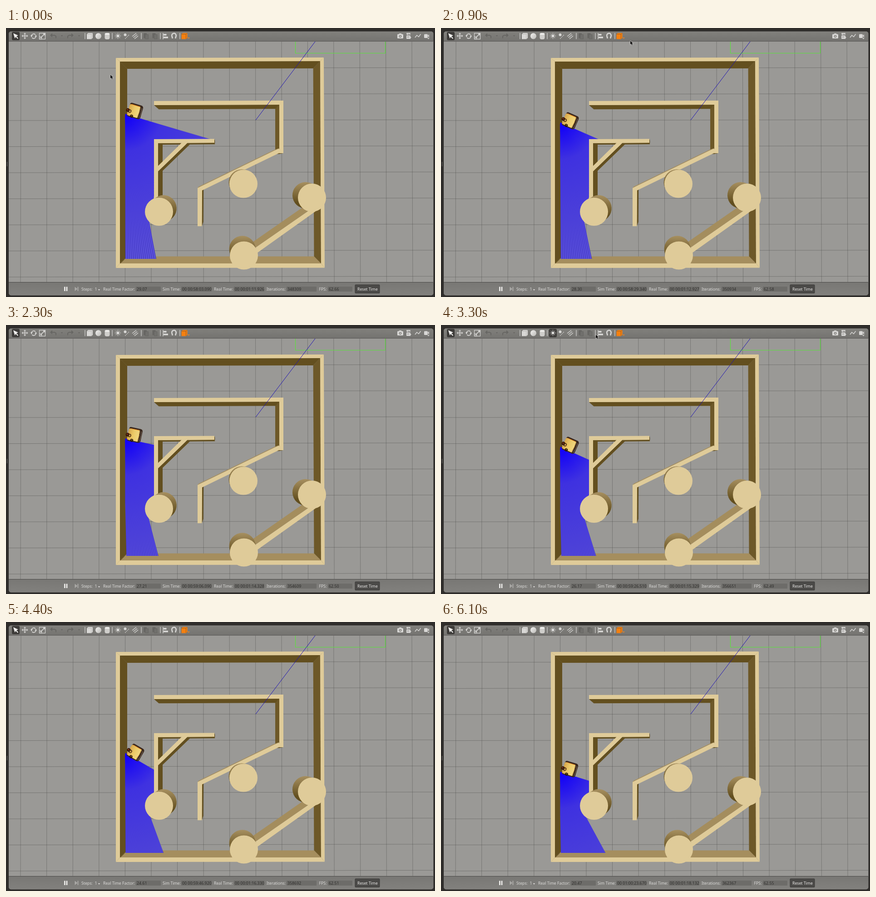
Recreate the animation shown at these times as an HTML page with a canvas. Size 945 px wide and 593 px high, loop 6200 ms.

```html
<!DOCTYPE html>
<html lang="en">
<head>
<meta charset="utf-8">
<title>Robot simulation</title>
<style>
html, body { margin: 0; width: 100%; height: 100%; overflow: hidden; background: #2f2d2b; }
canvas { display: block; }
</style>
</head>
<body>
<canvas id="stage" width="945" height="593"></canvas>
<script>
const g = document.getElementById('stage').getContext('2d');
const LOOP = 6200, STEP = 100, RAD = Math.PI / 180;
const EYE = { x: 476, y: 300, depth: 0.071 };
const LIGHT = '#dfcb99', MID = '#a58e5e', DARK = '#634f1f';
const ICON = '#d8d7d5', OFF = '#676663';

// Straight lines between [step, value] key points.
function along(keys, t, index = 1) {
  let i = 1;
  while (i < keys.length - 1 && keys[i][0] < t) i++;
  const a = keys[i - 1], b = keys[i];
  return a[index] + (b[index] - a[index]) * (t - a[0]) / (b[0] - a[0]);
}

const laserY = [[0, 190], [9, 209], [23, 251], [54, 308], [61, 331]];
const heading = [[0, 16.5], [9, 23.5], [23, 12], [33, 24], [44, 30], [61, 17]];
const pointerRuns = [
  [[0, 230, 103], [4, 80, 20], [9, 417, 28], [11, 430, 3]],
  [[30, 156, 16], [33, 341, 21], [38, 113, 6]]
];

function trace(points, close) {
  g.beginPath();
  for (let i = 0; i < points.length; i += 2) g.lineTo(points[i], points[i + 1]);
  if (close) g.closePath();
}
function poly(color, ...points) {
  trace(points, true);
  g.fillStyle = color;
  g.fill();
}
function line(color, width, ...points) {
  trace(points);
  g.strokeStyle = color;
  g.lineWidth = width;
  g.stroke();
}
function box(color, x, y, w, h, r = 0) {
  g.beginPath();
  g.roundRect(x, y, w, h, r);
  g.fillStyle = color;
  g.fill();
}
function disc(color, x, y, r) {
  g.beginPath();
  g.arc(x, y, r, 0, 7);
  g.fillStyle = color;
  g.fill();
}
function arc(color, width, x, y, r, from, to) {
  g.beginPath();
  g.arc(x, y, r, from, to);
  g.strokeStyle = color;
  g.lineWidth = width;
  g.stroke();
}
function ramp(x0, y0, x1, y1, ...colors) {
  const fill = g.createLinearGradient(x0, y0, x1, y1);
  colors.forEach((c, i) => fill.addColorStop(i / (colors.length - 1), c));
  return fill;
}
function text(str, x, color, size = 8.7) {
  g.font = size + 'px "Noto Sans", "Open Sans", sans-serif';
  g.fillStyle = color;
  g.fillText(str, x, 579);
}

function drawGround() {
  box('#9a9996', 6, 29, 935.5, 532);
  for (let k = 0; k < 16; k++) line('rgba(70,70,68,.42)', 1, 33 + 57.4 * k, 30, 32 + 57.6 * k, 560);
  for (let k = 0; k < 9; k++) line('rgba(70,70,68,.42)', 1, 6, 89 + 57.5 * k, 941, 87.3 + 57.5 * k);
}

// Where a point of a top face meets the floor, seen from above.
function floorPoint(x, y) {
  return [x + (EYE.x - x) * EYE.depth, y + (EYE.y - y) * EYE.depth];
}

// Sides facing the eye; those that point up the screen are lit.
function drawSides(quad) {
  for (let i = 0; i < 8; i += 2) {
    const x0 = quad[i], y0 = quad[i + 1], x1 = quad[(i + 2) % 8], y1 = quad[(i + 3) % 8];
    const len = Math.hypot(x1 - x0, y1 - y0), nx = (y1 - y0) / len, ny = (x0 - x1) / len;
    if (nx * (EYE.x - x0) + ny * (EYE.y - y0) <= 0) continue;
    const lit = Math.min(1, Math.max(0, -ny * 1.1 - nx * 0.15));
    const shade = `rgb(${99 + 66 * lit},${79 + 63 * lit},${31 + 63 * lit})`;
    poly(shade, x0, y0, x1, y1, ...floorPoint(x1, y1), ...floorPoint(x0, y0));
  }
}
function drawWalls(...quads) {
  quads.forEach(drawSides);
  quads.forEach(q => poly(LIGHT, ...q));
}

function drawOuterWalls() {
  drawWalls(
    [242, 66, 700, 65, 692, 73, 251, 74],
    [700, 65, 702, 528.5, 694, 519, 692, 73],
    [702, 528.5, 242, 529, 251, 519, 694, 519],
    [242, 529, 242, 66, 251, 74, 251, 519]);
}
function drawInnerWalls() {
  drawWalls(
    [326, 161, 611, 160, 611, 169, 326, 170],
    [602, 169, 611, 169, 611, 276, 602, 276],
    [421.5, 353, 601, 265.5, 605, 274, 432, 358],
    [422, 353, 432, 357, 431.5, 437, 422, 437],
    [326, 245, 459, 244.5, 459, 253, 326, 254],
    [326, 245, 335, 245, 335, 380, 326, 380],
    [387, 253, 400, 253, 335, 316, 335, 304],
    [550, 484, 668, 402, 682, 404, 553, 496]);
}

function drawCylinder(x, y) {
  const [baseX, baseY] = floorPoint(x, y);
  g.lineCap = 'round';
  line(ramp(0, baseY - 28, 0, baseY + 16, MID, DARK), 58, baseX, baseY, x, y);
  g.lineCap = 'butt';
  disc(LIGHT, x, y, 31);
}
function drawCylinders() {
  drawCylinder(337, 405);
  drawCylinder(523, 343.5);
  drawCylinder(674, 374);
  drawCylinder(524, 501.5);
}

function drawMarkers() {
  line('#5be23c', 1.2, 637.5, 30, 637.5, 55.5, 835.5, 55.5, 835.5, 30);
  line('#1c10b4', 1, 681, 30, 550, 203);
}

// Distance from the sensor to the nearest obstacle.
function castRay(x, y, c, s) {
  let d = (509 - y) / s;
  const hit = (t, ok) => { if (t > 0 && t < d && ok) d = t; };
  if (c < 0) hit((262.5 - x) / c, true);
  const side = (326 - x) / c, top = (245 - y) / s;
  hit(side, y + side * s > 245 && y + side * s < 385);
  hit(top, x + top * c > 325 && x + top * c < 459);
  const dx = 341 - x, dy = 403 - y, near = dx * c + dy * s, off = dx * s - dy * c, r = 31.5;
  if (Math.abs(off) < r) hit(near - Math.sqrt(r * r - off * off), true);
  return d;
}

function drawLaser(x, y, angle) {
  const ends = [];
  for (let a = angle; a < 98; a += 0.8) {
    const c = Math.cos(a * RAD), s = Math.sin(a * RAD), d = castRay(x, y, c, s);
    ends.push(x + c * d, y + s * d);
  }
  const glow = (...colors) => {
    const fill = g.createRadialGradient(x, y, 0, x, y, 320);
    [0, 0.07, 0.25, 1].forEach((p, i) => fill.addColorStop(p, colors[i]));
    return fill;
  };
  poly(glow('#1200ff', '#2212f6', '#4336e2', '#5c52da'), x, y, ...ends);
  const stroke = glow('rgba(16,0,255,.7)', 'rgba(24,8,240,.4)', 'rgba(40,24,215,.25)', 'rgba(26,16,150,.6)');
  for (let i = 0; i < ends.length; i += 2) line(stroke, 0.8, x, y, ends[i], ends[i + 1]);
}

function drawRobot(x, y, angle) {
  g.save();
  g.translate(x, y);
  g.rotate(angle * RAD);
  g.translate(16.2, -12.1);
  box('#38271d', -13, -16, 30, 31, [4, 5, 5, 3]);
  line('#827466', 1, 14.5, -11, 15.5, 0, 14.5, 12);
  box(ramp(-14, 0, 11, 0, '#d6a54a', '#ebc967', '#f0d780'), -13.5, -12.5, 25, 25.5, 3);
  line('#e88a22', 1.2, -10, -12.5, 10, -12.5);
  line('#9c6c28', 1, 10.5, -11, 11.5, 0, 10.5, 11);
  disc('#34170c', -14, 2, 4);
  disc('#8d3b18', -15, 1.5, 1.4);
  arc('#4a2b12', 1.6, -9.5, 3, 3, 0, 7);
  disc('#2a190c', -2.5, 12.5, 3.4);
  disc('#b8862f', -2.5, 11.5, 1.1);
  g.restore();
}

function highlight(x) {
  box('#3d3b39', x - 8.5, 8.5, 17, 18.5, 3);
}
function dropArrow(x, y, color) {
  poly(color, x - 2.3, y - 1, x + 2.3, y - 1, x, y + 1.8);
}
function curvedArrow(x, dir) {
  poly(OFF, x - 7 * dir, 16, x - 2 * dir, 11.5, x - 2 * dir, 20.5);
  line(OFF, 2, x - 3 * dir, 16, x + 3 * dir, 16, x + 6 * dir, 18, x + 6 * dir, 22.5);
}
function cube(x, face, edge) {
  poly(face, x, 13.5, x + 3, 11, x + 13, 11, x + 13, 22, x + 10, 24.5, x, 24.5);
  line(edge, 0.8, x, 13.6, x + 10, 13.6, x + 10, 24.5);
  line(edge, 0.8, x + 10, 13.6, x + 13, 11);
}
function page(x) {
  box(OFF, x - 5, 11.5, 7, 11, 1);
  box('#71706d', x - 1, 14, 6.5, 10.5, 1);
  g.strokeStyle = OFF;
  g.lineWidth = 1;
  g.strokeRect(x - 1, 14.5, 6.5, 9.5);
}

function drawEditTools() {
  poly('#f2f1ef', 16, 11.5, 27, 16.5, 23, 18, 27, 22.5, 25.5, 24, 21.5, 19.5, 19.5, 23);
  for (const [dx, dy] of [[1, 0], [-1, 0], [0, 1], [0, -1]]) {
    const x = 41.5 + dx * 4, y = 17.5 + dy * 4;
    line(ICON, 1.5, 41.5, 17.5, x, y);
    poly(ICON, x + dx * 3, y + dy * 3, x + dy * 2.8, y + dx * 2.8, x - dy * 2.8, y - dx * 2.8);
  }
  arc(ICON, 1.6, 61, 18, 5, -0.4, 2.4);
  arc(ICON, 1.6, 61, 18, 5, 2.8, 5.6);
  poly(ICON, 54, 16, 59, 16, 56, 20);
  poly(ICON, 63, 19, 68, 19, 66, 15.5);
  g.lineWidth = 1.2;
  g.strokeRect(73.5, 11.5, 13, 13);
  g.strokeRect(73.5, 19.5, 5, 5);
  line(ICON, 1.7, 75.5, 22.5, 84.5, 13.5);
  poly(ICON, 86, 12, 81, 12.5, 85.5, 17);
  curvedArrow(104, 1);
  dropArrow(123, 17, OFF);
  curvedArrow(142, -1);
  dropArrow(161, 17, OFF);
}

function drawShapeTools() {
  cube(178, '#d9d8d6', '#aeadaa');
  disc(ramp(198, 12, 210, 24, '#efeeec', '#bdbcb9'), 203.5, 17.8, 6.6);
  box('#cfcecb', 217.5, 11, 11, 14, 4);
  g.beginPath();
  g.ellipse(223, 13, 5.5, 2, 0, 0, 7);
  g.fillStyle = '#efeeec';
  g.fill();

  disc(ICON, 246.5, 17.5, 3.2);
  for (let i = 0; i < 8; i++) {
    const c = Math.cos(i * 45 * RAD), s = Math.sin(i * 45 * RAD);
    line(ICON, 1.2, 246.5 + c * 4.4, 17.5 + s * 4.4, 246.5 + c * 6.6, 17.5 + s * 6.6);
  }
  disc(ICON, 262.5, 15, 3);
  for (let i = 0; i < 4; i++) disc(ICON, 270 - i * 2.3, 16 + i * 2.3, 0.9);
  for (let i = 0; i < 3; i++) line(ICON, 1.3, 278 + i * 2.5, 18.5 + i * 2.8, 287 + i * 2, 11.5 + i * 3);

  page(308);
  page(327.5);
  line(ICON, 1.3, 346, 11, 346, 25);
  box(ICON, 347, 13, 6.5, 3.6);
  box(ICON, 347, 19, 10, 3.6);
  arc(ICON, 2.6, 370, 16.5, 4.8, 150 * RAD, 390 * RAD);
  for (const side of [-1, 1]) line(ICON, 2.6, 370 + side * 4.4, 18, 370 + side * 3.3, 23);
  cube(386.5, '#f5800f', '#8b5a2a');
  dropArrow(402.5, 22, '#e6862a');
}

function drawViewTools() {
  box(ICON, 862, 13.5, 13, 9.5, 1.5);
  box(ICON, 866, 12, 5, 3);
  disc('#74736f', 868.5, 18.2, 2.8);
  disc(ICON, 868.5, 18.2, 1.5);
  box(ICON, 882, 11, 9, 13, 1);
  g.font = 'bold 4.5px "Noto Sans", sans-serif';
  g.fillStyle = '#565552';
  g.fillText('LOG', 882, 17);
  line('#565552', 0.8, 883.5, 20, 889, 20);
  poly(ICON, 887, 20, 893, 20, 890, 24.5);
  line(ICON, 1.5, 901, 21, 905, 16, 909, 19.5, 913.5, 13.5);
  box(ICON, 921, 13.5, 8, 8.5, 1.5);
  poly(ICON, 929, 17, 932, 14, 932, 21.5);
  dropArrow(930.5, 23, ICON);
}

function drawToolbar(step) {
  box(ramp(0, 7, 0, 29, '#82817d', '#747370'), 6, 7.5, 935.5, 21.5, [5, 5, 0, 0]);
  box('#53524f', 6, 28.8, 935.5, 1);
  highlight(21.5);
  if (step === 4) highlight(80);
  if (step === 32 || step === 33) highlight(246.5);
  for (const x of [174, 234, 298, 340, 383]) line(ICON, 1.2, x, 11, x, 24.5);
  drawEditTools();
  drawShapeTools();
  drawViewTools();
}

function clock(seconds) {
  const pad = n => String(Math.floor(n)).padStart(2, '0');
  return `00 ${pad(seconds / 3600)}:${pad(seconds / 60 % 60)}:${(seconds % 60).toFixed(3).padStart(6, '0')}`;
}

function drawStatus(step) {
  box(ramp(0, 560, 0, 590, '#787774', '#82817e'), 6, 560, 935.5, 29.5, [0, 0, 5, 5]);
  box('#4b4a48', 6, 560, 935.5, 1);
  box('#ecebe9', 128, 570.5, 2.8, 9.5);
  box('#ecebe9', 132.6, 570.5, 2.8, 9.5);
  poly('#aaa9a6', 151.5, 570.5, 157.5, 575.3, 151.5, 580);
  box('#aaa9a6', 157.5, 570.5, 2, 9.5);

  // Readouts refresh every second step; the simulation slows after tick 12.
  const tick = (step + 1) >> 1, late = Math.max(0, tick - 12);
  const iterations = Math.round(348309 + 525 * tick - 116.7 * late);
  const factor = 29.07 - 0.155 * tick - 0.0105 * late * late;
  const second = Math.floor((step + 8) / 10);
  const rate = 62.66 - 0.09 * second + 0.012 * second * second;

  const label = '#dedddb';
  text('Steps:', 166, label);
  text('1', 195.5, label);
  dropArrow(205, 577, label);
  const fields = [
    ['Real Time Factor:', 214, 286, 55, factor.toFixed(2)],
    ['Sim Time:', 345, 386, 67, clock(iterations / 100)],
    ['Real Time:', 458, 502, 67, clock(71.926 + 0.2002 * tick)],
    ['Iterations:', 574, 618, 66, String(iterations)],
    ['FPS:', 689.5, 709, 54, rate.toFixed(2)]
  ];
  for (const [name, x, fieldX, w, value] of fields) {
    text(name, x, label);
    box('#6d6c69', fieldX, 570, w, 11, 1);
    text(value, fieldX + 2, '#2f2e2c', 8.8);
  }
  box('#3c3b39', 768.5, 565.5, 55, 19.5, 2);
  box('#4b4a48', 769.5, 566.5, 53, 17.5, 1);
  text('Reset Time', 774, '#ecebe9');
}

function drawPointer(step) {
  const run = pointerRuns.find(r => step >= r[0][0] && step <= r[r.length - 1][0]);
  if (!run) return;
  g.save();
  g.translate(along(run, step, 1), along(run, step, 2));
  const shape = [0, 0, 0, 8.5, 2, 6.8, 3.6, 10, 5, 9.3, 3.5, 6.2, 6, 6];
  line('#d5d4d2', 1.3, ...shape, 0, 0);
  poly('#141312', ...shape);
  g.restore();
}

function draw(step) {
  const x = 263.5, y = along(laserY, step), angle = along(heading, step);
  box('#2f2d2b', 0, 0, 945, 593);
  drawGround();
  drawOuterWalls();
  drawLaser(x, y, angle);
  drawInnerWalls();
  drawCylinders();
  drawRobot(x, y, angle);
  drawMarkers();
  drawToolbar(step);
  drawStatus(step);
  line('#6d6b68', 1, 2.5, 295, 2.5, 305);
  drawPointer(step);
}

let shown = -1;
function animate() {
  const step = Math.floor(performance.now() % LOOP / STEP);
  if (step !== shown) draw(shown = step);
  requestAnimationFrame(animate);
}
animate();
</script>
</body>
</html>
```
